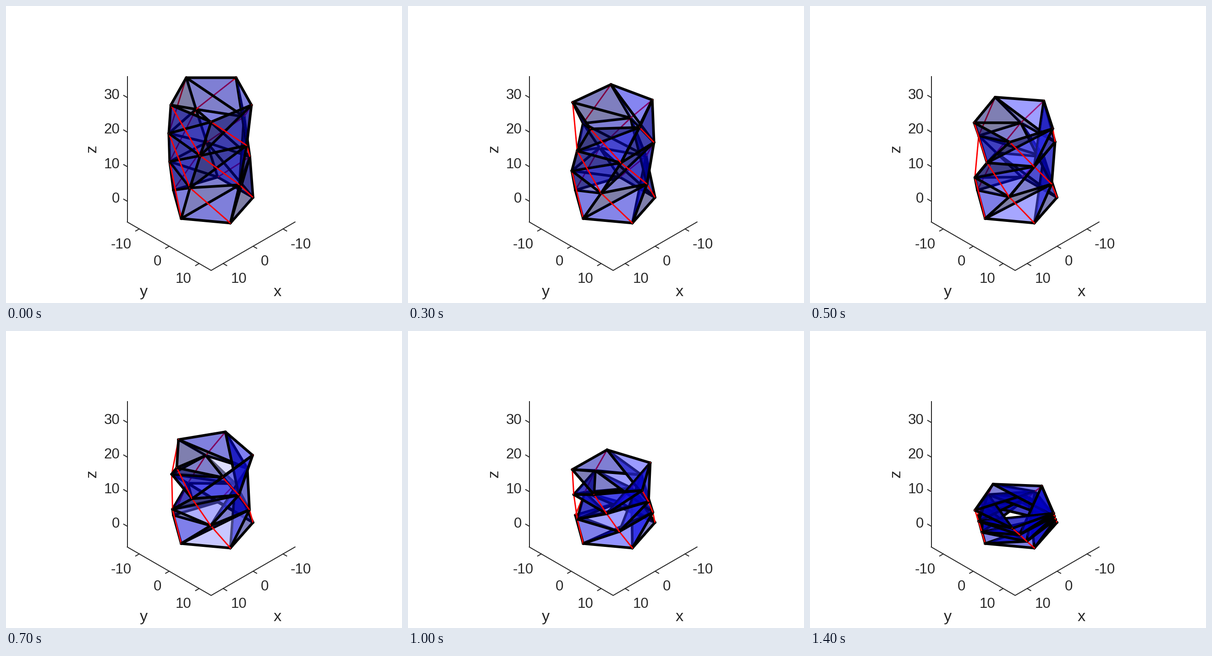
Recreate the animation shown at these times as a matplotlib script. Size 864 px wide and 648 px high, loop 1.5 s.

```python
import numpy as np
import matplotlib.pyplot as plt
from matplotlib.animation import FuncAnimation

W, H, DPI = 864, 648, 100
FRAMES, INTERVAL = 15, 100
SIDES, LAYERS, RADIUS = 5, 3, 10
LIM, Z_LOW, Z_HIGH = 14, -6, 36

# Isometric camera; points are stored as (right, toward viewer, up).
CX, CY, SCALE = 447.6, 426.0, 9.243
VIEW = np.array([0, np.sqrt(2 / 3), np.sqrt(1 / 3)])
LIGHT = np.array([-0.5, 0.5, np.sqrt(0.5)])

FACE_ALPHA, BLACK_W, RED_W = 0.5, 5.8, 3.0
LINE_BIAS = 0.25
INK = (0.15, 0.15, 0.15)

# Raster window for the shaded body.
X0, X1, Y0, Y1 = 345, 550, 145, 485
GX, GY = np.meshgrid(np.arange(X0, X1) + 0.5, np.arange(Y0, Y1) + 0.5)
GX, GY = GX.ravel(), GY.ravel()

# Layer height and twist over time, as smooth curves through key poses.
KEYS = [0, 3, 5, 7, 9, 12, 14]
HEIGHT = np.polyfit(KEYS, [10, 8.92, 8.0, 6.93, 5.72, 3.69, 2.1], 4)
TWIST = np.polyfit(KEYS, [15, 28, 36.5, 44.4, 50.9, 58.5, 61.7], 4)

# The free rings are squeezed inward while folding, the fixed base is not.
SQUEEZE = (0, 0.51, 0.6, 0.23)


def project(p):
    """Screen x, screen y and nearness of a point."""
    return (CX + SCALE * p[0],
            CY + SCALE * (VIEW[2] * p[1] - VIEW[1] * p[2]),
            VIEW @ p)


def rings(i):
    height, twist = np.polyval(HEIGHT, i), np.polyval(TWIST, i)
    squeeze = i * (21 - i) / 110
    levels = []
    for k in range(LAYERS + 1):
        a = np.radians(135 - k * twist + 360 / SIDES * np.arange(SIDES))
        r = RADIUS - SQUEEZE[k] * squeeze
        z = np.full(SIDES, k * height)
        levels.append(np.column_stack([r * np.cos(a), r * np.sin(a), z]))
    return levels


def build(levels):
    """Triangles, thick edges and thin cables of the folded tower."""
    faces, edges, cables = [], [], []
    for ring in levels:
        edges += [(ring[j], ring[j - 1]) for j in range(SIDES)]
    for low, up in zip(levels, levels[1:]):
        for j in range(SIDES):
            faces += [(low[j], low[j - 1], up[j - 1]), (up[j], up[j - 1], low[j])]
            edges += [(low[j], up[j]), (low[j], up[j - 1])]
            cables.append((up[j], low[j - 1]))
    return faces, edges, cables


def shade(a, b, c):
    n = np.cross(b - a, c - a)
    n /= np.linalg.norm(n)
    if n @ VIEW < 0:
        n = -n
    diffuse = max(n @ LIGHT, 0)
    gleam = max(2 * diffuse * (n @ VIEW) - LIGHT @ VIEW, 0) if diffuse else 0
    spec = 0.9 * gleam ** 10
    return np.clip([spec, spec, 0.3 + 0.6 * diffuse + spec], 0, 1)


def face_fragments(tri):
    (ax, ay, ad), (bx, by, bd), (cx, cy, cd) = map(project, tri)
    area = (bx - ax) * (cy - ay) - (cx - ax) * (by - ay)
    if abs(area) < 1:
        return None
    v = ((GX - ax) * (cy - ay) - (cx - ax) * (GY - ay)) / area
    w = ((bx - ax) * (GY - ay) - (GX - ax) * (by - ay)) / area
    pix = np.flatnonzero((v >= 0) & (w >= 0) & (v + w <= 1))
    depth = ad + v[pix] * (bd - ad) + w[pix] * (cd - ad)
    return pix, depth, np.full(len(pix), FACE_ALPHA), shade(*tri)


def line_fragments(seg, width, color):
    (ax, ay, ad), (bx, by, bd) = map(project, seg)
    dx, dy = bx - ax, by - ay
    t = np.clip(((GX - ax) * dx + (GY - ay) * dy) / (dx * dx + dy * dy), 0, 1)
    dist = np.hypot(GX - ax - t * dx, GY - ay - t * dy)
    cover = np.clip(width / 2 + 0.5 - dist, 0, 1)
    pix = np.flatnonzero(cover)
    return pix, ad + t[pix] * (bd - ad) + LINE_BIAS, cover[pix], np.array(color)


def render(i):
    """Blend all fragments back to front, separately in each pixel."""
    faces, edges, cables = build(rings(i))
    parts = [f for f in map(face_fragments, faces) if f is not None]
    parts += [line_fragments(s, BLACK_W, (0, 0, 0)) for s in edges]
    parts += [line_fragments(s, RED_W, (1, 0, 0)) for s in cables]
    pix, depth, alpha = (np.concatenate([p[k] for p in parts]) for k in range(3))
    color = np.concatenate([np.tile(p[3], (len(p[0]), 1)) for p in parts])

    order = np.lexsort((depth, pix))
    pix, alpha, color = pix[order], alpha[order, None], color[order]
    _, start, count = np.unique(pix, return_index=True, return_counts=True)
    img = np.ones((GX.size, 3))
    for rank in range(count.max()):
        s = start[count > rank] + rank
        img[pix[s]] += alpha[s] * (color[s] - img[pix[s]])
    return img.reshape(Y1 - Y0, X1 - X0, 3)


def xyz(x, y, z):
    """Screen position of a point in data coordinates."""
    return project(np.array([y - x, x + y, z * np.sqrt(2)]) / np.sqrt(2))[:2]


def stroke(*points):
    xs, ys = zip(*(xyz(*p) for p in points))
    ax.plot(xs, ys, color=INK, lw=2 * 72 / DPI, solid_capstyle="projecting",
            solid_joinstyle="miter")


def label(x, y, s, px=31.25, **kw):
    opts = dict(ha="center", va="baseline", color=INK, family="Liberation Sans")
    ax.text(x, y, s, fontsize=px * 72 / DPI, **{**opts, **kw})


def draw_axes():
    stroke((LIM, -LIM, Z_HIGH), (LIM, -LIM, Z_LOW))
    stroke((LIM, -LIM, Z_LOW), (LIM, LIM, Z_LOW), (-LIM, LIM, Z_LOW))
    tick = 1.2
    for v, xl, yl, base in [(-10, 643, 251, 529), (0, 564, 330, 566),
                            (10, 508, 387, 604)]:
        stroke((v, LIM, Z_LOW), (v, LIM + tick, Z_LOW))
        stroke((LIM, v, Z_LOW), (LIM + tick, v, Z_LOW))
        label(xl, base, str(v))
        label(yl, base, str(v))
    for v in (0, 10, 20, 30):
        stroke((LIM, -LIM, v), (LIM, -LIM - tick, v))
        label(248.5, 429 - 7.547 * v, str(v), ha="right")
    label(592, 633, "x", 34.4)
    label(301, 633, "y", 34.4)
    label(188, 311, "z", 34.4, rotation=90, va="center")


fig = plt.figure(figsize=(W / DPI, H / DPI), dpi=DPI, facecolor="white")
ax = fig.add_axes([0, 0, 1, 1])
body = ax.imshow(np.ones((Y1 - Y0, X1 - X0, 3)), extent=(X0, X1, Y1, Y0),
                 interpolation="nearest", aspect="auto")
draw_axes()
ax.set_xlim(0, W)
ax.set_ylim(H, 0)
ax.axis("off")

cache = {}


def update(i):
    if i not in cache:
        cache[i] = render(i)
    body.set_data(cache[i])
    return [body]


anim = FuncAnimation(fig, update, frames=FRAMES, interval=INTERVAL,
                     repeat=True, repeat_delay=0)
plt.show()
```
